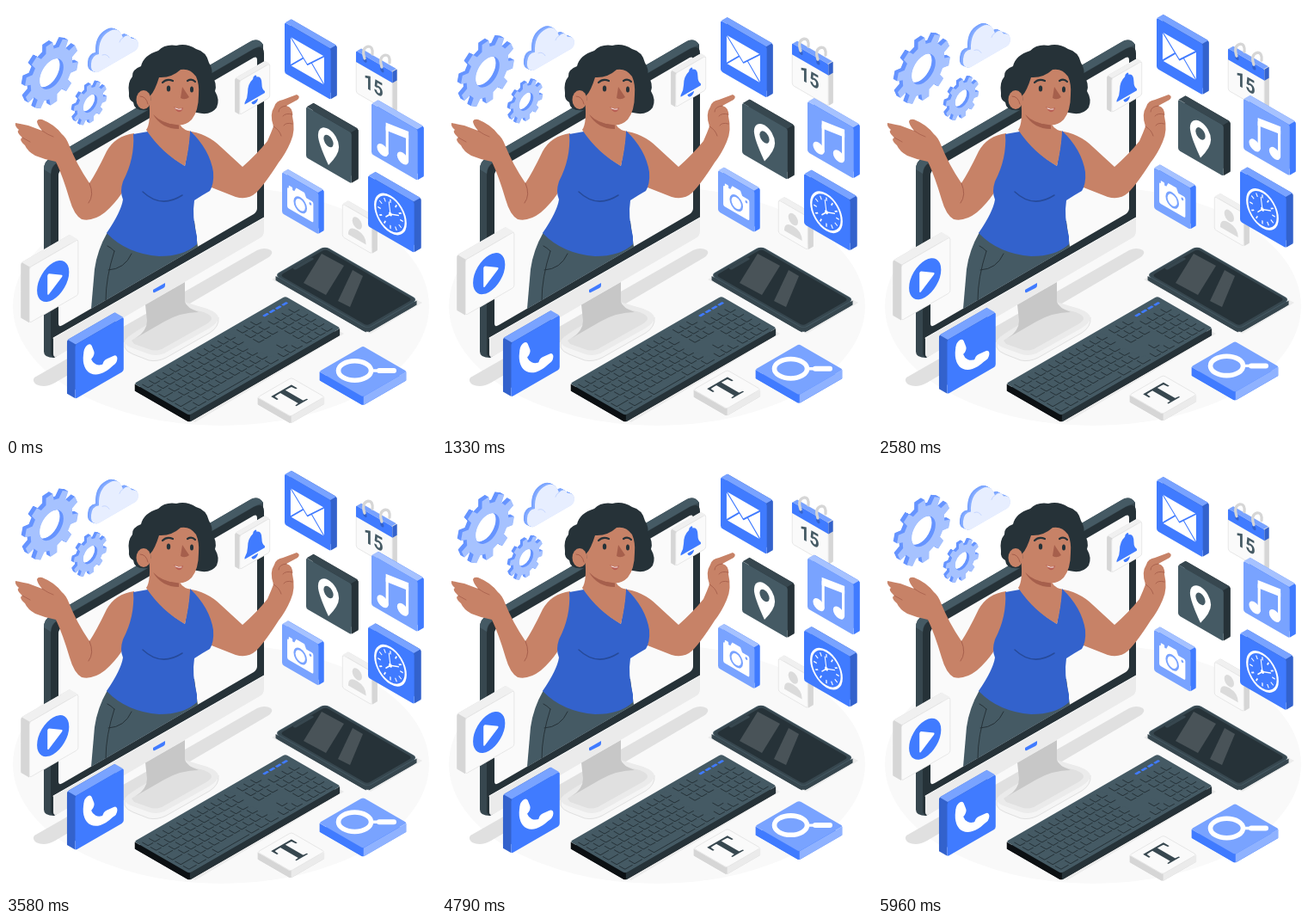
Animation, 500 px wide and 500 px high, one loop 6000 ms. Source, as an HTML page:

```html
<!DOCTYPE html>
<html lang="en">
<head>
<meta charset="utf-8">
<title>Floating apps</title>
<style>
html, body { margin: 0; width: 100%; height: 100%; overflow: hidden; background: #fff; }
svg { display: block; width: 100%; height: 100%; }
</style>
</head>
<body>
<svg id="stage" viewBox="0 0 500 500"></svg>
<script>
const BLUE = '#407bff', NAVY = '#3362cc', SKY = '#79a3ff', PALE = '#a6c2ff';
const INK = '#263238', SLATE = '#37474f', STEEL = '#455a64';
const SKIN = '#c78267', SHADE = '#a65f4c';

const path = (d, fill, extra = '') => `<path d="${d}" fill="${fill}" ${extra}/>`;
const line = (d, stroke, width, extra = '') =>
  `<path d="${d}" fill="none" stroke="${stroke}" stroke-width="${width}" stroke-linecap="round" stroke-linejoin="round" ${extra}/>`;
const circle = (x, y, r, fill, extra = '') => `<circle cx="${x}" cy="${y}" r="${r}" fill="${fill}" ${extra}/>`;
const oval = (x, y, rx, ry, fill) => `<ellipse cx="${x}" cy="${y}" rx="${rx}" ry="${ry}" fill="${fill}"/>`;
const rect = (x, y, w, h, r, fill, extra = '') =>
  `<rect x="${x}" y="${y}" width="${w}" height="${h}" rx="${r}" fill="${fill}" ${extra}/>`;
const float = (period, art) => `<g class="float" data-period="${period}">${art}</g>`;

// Isometric planes: skew matrix and local direction of the thickness.
const PLANES = {
  right: ['.866 .5 0 1', 1, -1],
  left: ['.866 -.5 0 1', -1, -1],
  flat: ['.866 -.5 .866 .5', -1, 1]
};
const onPlane = (plane, x, y, art) => `<g transform="matrix(${PLANES[plane][0]} ${x} ${y})">${art}</g>`;

function plate(plane, x, y, w, h, depth, [face, side, edge], art = '', r = 2.5) {
  const [, sx, sy] = PLANES[plane];
  const dx = sx * depth, dy = sy * depth, k = r * .3;
  const ex = sx > 0 ? w : 0, ey = sy > 0 ? h : 0;
  return onPlane(plane, x, y,
    rect(dx, dy, w, h, r, side) +
    path(`M${k} ${ey}l${dx} ${dy}h${w - 2 * k}l${-dx} ${-dy}z`, edge) +
    path(`M${ex} ${k}l${dx} ${dy}v${h - 2 * k}l${-dx} ${-dy}z`, side) +
    rect(0, 0, w, h, r, face) + art);
}

const outline = (w, h) => rect(.3, .3, w - .6, h - .6, 2.5, 'none', 'stroke="#e0e0e0" stroke-width=".7"');

function gear(x, y, radius, hole, teeth, depth) {
  let d = '';
  const inner = radius * .78, step = 2 * Math.PI / teeth, turn = .37;
  for (let i = 0; i < teeth; i++) {
    [[-.3, inner], [-.2, radius], [.2, radius], [.3, inner]].forEach(([f, r]) => {
      const a = (i + f + turn) * step;
      d += `${d ? 'L' : 'M'}${(r * Math.cos(a)).toFixed(2)} ${(r * Math.sin(a)).toFixed(2)}`;
    });
  }
  d += `zM${hole} 0A${hole} ${hole} 0 1 0 ${-hole} 0A${hole} ${hole} 0 1 0 ${hole} 0z`;
  let art = '';
  for (let s = depth; s >= 0; s -= .5) {
    art += path(d, s ? '#6694ff' : PALE, `fill-rule="evenodd" transform="translate(${-s} ${-s})"`);
  }
  return onPlane('left', x, y, art);
}

function backdrop() {
  return oval(250, 349, 242, 139, '#f9f9f9') +
    path('M33 432L292 284Q301 280 308 284Q312 288 304 293L57 438Q45 445 35 440Q30 436 33 432z', '#e0e0e0') +
    path('M138 390V397Q140 402 148 405L166 412Q176 414 186 409L237 380Q248 373 247 362z', '#f5f5f5', 'stroke="#e0e0e0"') +
    path('M138 390Q138 386 160 373L207 344L234 352Q247 357 247 363Q246 369 236 375L184 404Q174 408 164 404L145 397Q138 394 138 390z', '#ebebeb') +
    path('M146 389L165 376Q184 368 207 350L230 356Q240 360 239 364Q237 368 231 371L181 399Q173 402 166 399L149 393z', '#e0e0e0') +
    path('M162 347L208 321V344Q210 351 224 356Q203 356 184 367L151 386Q164 378 164 366z', '#c7c7c7');
}

function monitor() {
  return path('M44 190Q44 181 51 177L283 42Q293 36 299 45L300 250L56 409Q44 409 44 402z', SLATE) +
    path('M52 197Q52 187 60 182L288 50Q300 44 300 55V260L55 409L52 405z', INK) +
    path('M44 190Q44 181 51 177L283 42Q293 36 299 45L289 49L59 182Q52 187 52 195z', STEEL) +
    path('M61 197Q61 192 66 189L288 60Q292 58 292 63V235Q292 239 288 242L66 371Q61 374 61 369z', '#fafafa') +
    path('M55 386L300 246V262Q300 267 295 270L60 407Q55 410 55 404z', '#ebebeb') +
    line('M55 386L300 246', '#fff', 1) +
    path('M171 330L185 322V325Q185 327 183 328L173 333Q171 334 171 332z', BLUE);
}

function woman() {
  const pants = path('M118 263Q106 284 103 306L99 352L223 280L219 250L135 240z', STEEL) +
    line('M116 342Q116 316 126 285M119 307Q138 306 146 288M126 285Q122 281 118 279', INK, 1);
  const leftArm = path('M11 136Q17 137 26 139L42 145Q36 138 36 134Q37 131 42 132Q57 138 65 149Q70 153 73 161Q82 184 97 206Q105 194 117 169Q127 151 149 148L148 190Q138 220 115 240Q101 251 88 248Q79 243 74 225Q66 198 58 181Q46 179 34 174Q25 169 22 162Q14 155 19 153Q11 146 15 144Q10 140 11 136z', SKIN) +
    line('M97 206Q103 220 96 229', SHADE, 1) + line('M42 145Q49 150 55 152M19 153L28 158', SHADE, .8);
  const rightArm = path('M210 145Q234 148 250 164L275 187Q292 172 304 157Q308 148 311 140Q306 126 312 117Q314 110 322 109L338 103Q343 105 339 109L326 116Q334 118 333 128Q337 145 331 158Q325 172 317 182Q301 207 291 217Q281 226 267 222L239 211z', SKIN) +
    line('M326 116Q317 117 317 123M333 126Q325 124 322 128M333 137Q325 135 323 139M311 140Q318 144 320 151', SHADE, .9);
  const hair = path('M143 101Q141 89 147 82Q146 74 157 70Q160 57 177 52Q185 44 198 46Q210 43 221 50Q233 53 236 66Q241 74 239 81Q246 90 243 99Q249 109 245 118Q238 128 222 124L180 118L165 121Q149 123 148 112Q142 109 143 101z', INK);
  const top = path('M148 149L165 146Q183 171 208 186Q212 166 214 145Q237 167 241 193Q242 207 237 215Q228 220 219 226Q216 245 222 268V277Q207 291 178 291Q140 288 117 264Q134 239 136 225Q132 216 136 204Q150 177 148 149z', NAVY) +
    line('M159 216Q180 236 205 220', '#264a9a', 1.5);
  const head = path('M166 108Q169 136 163 144Q181 171 208 186Q213 166 214 146Q202 143 201 133z', SKIN) +
    path('M171 126Q184 139 201 137L201 143Q181 143 171 126z', SHADE) +
    path('M168 104Q173 99 178 83Q192 84 203 74Q214 72 221 82Q225 91 224 103Q224 122 216 132Q208 140 198 138Q177 135 169 120z', SKIN) +
    oval(160, 109, 8.5, 11, SKIN) + line('M156 105Q163 105 165 114', SHADE, 1) +
    oval(189, 96, 2.2, 3.6, INK) + oval(216, 97, 2, 3.5, INK) +
    line('M182 89Q187 84 194 87M211 87Q216 84 220 88', INK, 2.2) +
    path('M205 94L213 106Q208 110 203 107z', SHADE) +
    path('M195 117Q201 121 206 118Q205 124 200 123Q197 121 195 117z', '#b85f55') +
    line('M197 119Q201 121 204 120', '#fff', .9);
  return pants + leftArm + rightArm + hair + top + head;
}

function keyboard() {
  let keys = '';
  const key = (x, y, w, h = 8.6) => {
    keys += rect(x - 1, y + 1, w, h, 1, INK) + rect(x, y, w, h, 1, STEEL);
  };
  for (let row = 0; row < 6; row++) {
    const y = 5 + row * 11;
    if (row === 5) {
      [5, 18, 31, 89, 102, 115].forEach(x => key(x, y, 11));
      key(44, y, 43);
    } else {
      const first = row > 1 ? 8 + row * 2 : 7.8;
      key(5, y, first);
      for (let x = 6.4 + first; x < 119; x += 9.2) key(x, y, Math.min(7.8, 126 - x));
    }
    for (let i = 0; i < 3; i++) {
      if (row < 3 || row === 5 || (row === 4 && i === 1)) key(132 + i * 9.2, y, 7.8);
    }
    for (let i = 0; row && i < 4; i++) key(163 + i * 9.2, y, 7.8);
  }
  for (let i = 0; i < 4; i++) keys += rect(165 + i * 8.5, 7, 6.5, 3, .6, BLUE);
  return path('M158 447L326 345L393 381L220 484z', '#ebebeb') +
    plate('flat', 149, 439, 203, 74, 8, [STEEL, '#0c1013', INK], keys, 3);
}

function tablet() {
  return path('M309 318L370 284L484 345L424 381z', '#ebebeb') +
    plate('flat', 312, 313, 68, 125, 5, [STEEL, SLATE, SLATE],
      rect(1, 1, 66, 123, 5, SLATE) + rect(3.5, 4, 61, 117, 4, INK) + rect(20, 4, 26, 4, 2, SLATE), 6) +
    path('M367 288L393 302L372 336L346 322z', '#fff', 'opacity=".16"') +
    path('M403 307L415 314L400 350L386 343z', '#fff', 'opacity=".16"');
}

function cloud() {
  const d = 'M104 77Q98 76 99 67Q100 57 108 56Q107 36 121 29Q132 24 136 37Q142 31 146 38Q154 37 154 45Q154 51 147 54L109 76Q106 78 104 77z';
  let art = '';
  for (let i = 8; i > 0; i--) art += path(d, i > 4 ? SKY : '#86adff', `transform="translate(${-i / 2} ${-i / 4})"`);
  return art + path(d, '#e7eeff') + line('M112 57Q117 55 120 60M136 37Q133 38 132 42', '#c5d6ff', 1);
}

const white = ['#fafafa', '#d6d6d6', '#f0f0f0'];
const light = [SKY, BLUE, PALE], vivid = [BLUE, NAVY, SKY];

function mail() {
  return plate('right', 324, 19, 62, 59, 8, vivid,
    rect(8, 13, 45, 33, 1, '#fff') + line('M8 13L30.5 34L53 13M8 46L25 29M53 46L36 29', BLUE, 1.5));
}

function calendar() {
  const ring = (x, y) => line(`M${x - 4} ${y + 14}Q${x - 8} ${y + 2} ${x} ${y}Q${x + 6} ${y} ${x + 5} ${y + 9}`, '#d6d6d6', 3.2);
  return plate('right', 407, 52, 49, 49, 6, white,
    outline(49, 49) +
    path('M0 13V2Q0 0 2 0H47Q49 0 49 2V13z', BLUE) +
    path('M1 0L7 -6H54L48 0z', SKY) + path('M49 0L55 -6V7L49 13z', NAVY) +
    circle(12, 5, 2.5, NAVY) + circle(35, 5, 2.5, NAVY) +
    `<text x="23.5" y="36.5" text-anchor="middle" font-family="Roboto, sans-serif" font-weight="700" font-size="23" fill="${STEEL}">15</text>`) +
    ring(421, 47) + ring(441, 57);
}

function place() {
  return plate('right', 349, 117, 61, 59, 9, [STEEL, INK, SLATE],
    path('M30 53Q16 34 16 25A14 14 0 0 1 44 25Q44 34 30 53z', '#fff') + circle(30, 25, 6.5, STEEL));
}

function music() {
  return plate('right', 425, 113, 62, 59, 8, light,
    line('M21 47V18L48 13V43', '#fff', 3.6) + path('M19.2 13L49.8 8V17L19.2 22z', '#fff') +
    oval(15, 47, 7.6, 6.5, '#fff') + oval(42, 43, 7.6, 6.5, '#fff'));
}

function clock() {
  let ticks = '';
  for (let i = 0; i < 12; i++) ticks += `<path d="M30 13v4" stroke="#fff" stroke-width="1.5" transform="rotate(${i * 30} 30 30)"/>`;
  return plate('right', 421, 197, 62, 59, 9, vivid,
    circle(30, 30, 20.5, 'none', 'stroke="#fff" stroke-width="2.6"') + ticks +
    line('M30 30L28 17M30 30L41 26M30 30L24 36', '#fff', 1.3) + circle(30, 30, 2.2, '#fff'));
}

function camera() {
  return plate('right', 321, 193, 49, 48, 7, light,
    rect(7, 14, 35, 24, 2, '#fff') + path('M16 15L19 9H30L33 15z', '#fff') + rect(9, 11, 5, 4, 1, '#fff') +
    circle(24.5, 26, 9, SKY) + circle(24.5, 26, 6.5, '#fff') + circle(38, 18, 1.6, SKY));
}

function contact() {
  return plate('right', 391, 229.5, 40, 39, 7, white,
    outline(40, 39) + circle(20, 13, 6.5, '#dbdbdb') + path('M8 32Q8 21 20 21Q32 21 32 32z', '#dbdbdb'));
}

function bell() {
  return plate('left', 271.5, 87, 41, 40, 6, white,
    outline(41, 40) +
    path('M20.5 4Q23 4 23 7Q30 9 30 19Q30 25 34 29V31H7V29Q11 25 11 19Q11 9 18 7Q18 4 20.5 4zM16 33H25Q24 37 20.5 37Q17 37 16 33z', BLUE));
}

function player() {
  return plate('left', 27, 304, 66, 65, 11, white,
    outline(66, 65) + circle(32, 32, 21.5, BLUE) + line('M26 22V43L43 32z', '#fff', 3, 'style="fill:#fff"'));
}

function call() {
  return plate('left', 80.5, 394, 65, 63, 11, vivid,
    line('M16 17C13 35 30 51 48 45', '#fff', 10) + line('M17 14L20 22M42 43L51 44', '#fff', 11));
}

function letter() {
  return plate('flat', 292, 455, 46, 45, 8, ['#fafafa', '#d6d6d6', '#ebebeb'],
    outline(46, 45) +
    `<text x="24" y="36.5" text-anchor="middle" font-family="Liberation Serif, serif" font-weight="700" font-size="43" fill="${SLATE}">T</text>`);
}

function search() {
  return plate('flat', 364, 425, 59, 59, 10, [SKY, BLUE, '#8fb2ff']) +
    `<ellipse cx="405.5" cy="424" rx="19" ry="11.2" fill="none" stroke="#fff" stroke-width="5.6"/>` +
    line('M426 424H432', '#fff', 3.4) + line('M434 424H451', '#fff', 6);
}

const SHORT = 1500, MEDIUM = 3000, LONG = 6000, RISE = 10;

const stage = document.getElementById('stage');
stage.innerHTML = backdrop() + monitor() + woman() +
  float(SHORT, gear(53, 79, 36, 16, 10, 5) + gear(98, 113.5, 22.5, 9.5, 10, 3.5) + cloud()) +
  float(MEDIUM, bell() + calendar()) +
  float(LONG, place() + contact()) +
  float(SHORT, mail() + music() + clock() + camera()) +
  float(MEDIUM, player()) +
  keyboard() + tablet() +
  float(MEDIUM, letter()) +
  float(SHORT, call() + search());

const floats = [...stage.querySelectorAll('.float')];
const start = performance.now();

function draw(now) {
  const time = Math.max(0, now - start) % LONG;
  floats.forEach(node => {
    const phase = time / node.dataset.period % 1;
    const lift = RISE * (1 - Math.abs(1 - 2 * phase));
    node.setAttribute('transform', `translate(0 ${-lift.toFixed(3)})`);
  });
  requestAnimationFrame(draw);
}
draw(start);
</script>
</body>
</html>
```
